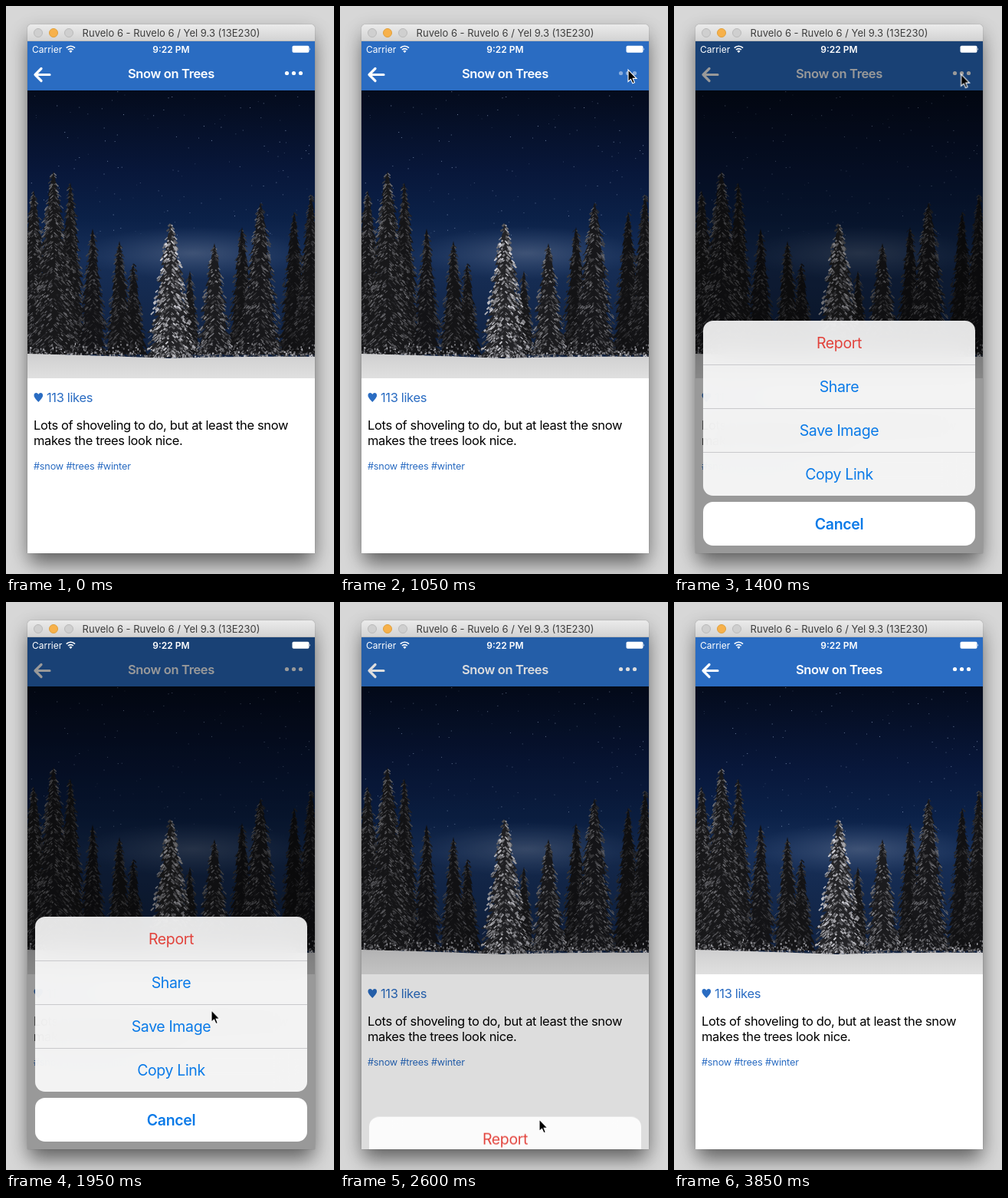
An HTML page with a canvas for the animation above (3900 ms loop, 428 px wide and 740 px high).

```html
<!DOCTYPE html>
<html lang="en">
<head>
<meta charset="utf-8">
<title>Photo action sheet</title>
<style>
  :root { --loop: 3900ms linear infinite; --blue: #2a6cc2; --out: cubic-bezier(.38, .7, .125, 1); }
  * { box-sizing: border-box; }
  html, body { margin: 0; width: 100%; height: 100%; overflow: hidden; background: #d7d7d7; }
  body { position: relative; font-family: Inter, "Open Sans", sans-serif; letter-spacing: -.0225em; }
  body *, canvas { position: absolute; }
  .mid { left: 0; width: 100%; text-align: center; white-space: nowrap; }

  .window {
    left: 28px; top: 24px; width: 375px; height: 689px; border-radius: 5px 5px 0 0;
    box-shadow: 0 0 1px rgba(0,0,0,.5), 0 16px 26px -3px rgba(0,0,0,.5), 0 4px 24px rgba(0,0,0,.12);
  }
  .bar {
    width: 375px; height: 22px; border-radius: 5px 5px 0 0;
    background: linear-gradient(#ebebeb, #d3d3d3); border-bottom: 1px solid #b9b9b9;
    font-size: 13px; line-height: 22px; letter-spacing: 0; color: #3e3e3e;
  }
  .bar i { top: 5px; width: 12px; height: 12px; border-radius: 50%; background: #cfcfcf; border: 1px solid #bababa; }
  .bar .on { background: #f7b14b; border-color: #e0a03c; }

  .screen { top: 22px; width: 375px; height: 667px; overflow: hidden; background: #fff; }
  .nav { width: 375px; height: 64px; background: var(--blue); }
  .nav b { top: 32px; font: 600 16.5px/20px Inter, sans-serif; color: #fff; }
  canvas { left: 0; top: 64px; width: 375px; height: 375px; }
  .likes { left: 25px; top: 454px; font-size: 16.5px; line-height: 20px; color: var(--blue); white-space: nowrap; }
  .text { left: 8px; top: 490px; font-size: 16.5px; line-height: 20px; color: #000; white-space: nowrap; }
  .tags { left: 8px; top: 546px; font-size: 12.7px; line-height: 16px; letter-spacing: -.015em; color: var(--blue); white-space: nowrap; }
  svg { left: 0; top: 0; overflow: visible; }
  .dots { animation: press var(--loop); }
  .dim { inset: 0; background: #000; opacity: 0; animation: dim var(--loop); }
  .status { width: 375px; height: 20px; font-size: 12px; line-height: 21px; letter-spacing: 0; color: #fff; }
  .status span { left: 6px; }
  .status b { font-weight: 600; }

  .sheet { left: 10px; top: 364px; width: 355px; height: 293px; transform: translateY(303px); animation: sheet var(--loop); }
  .group, .cancel { width: 355px; border-radius: 13px; overflow: hidden; }
  .group { height: 228px; background: rgba(255,255,255,.885); -webkit-backdrop-filter: blur(18px); backdrop-filter: blur(18px); }
  .cancel { top: 236px; height: 57px; background: #fff; }
  .row { height: 57px; font-size: 19.5px; line-height: 58px; color: #0a7ae8; }
  .cancel .row { font-weight: 600; }
  .red { color: #e2433c; }
  .line { width: 355px; height: 1px; background: #c9c9cc; animation: lines var(--loop); }
  .cursor { width: 14px; height: 20px; animation: move var(--loop), show var(--loop); }

  @keyframes press { 0%, 25.1% { opacity: 1 } 25.11%, 27.04% { opacity: .45 } 27.05%, 100% { opacity: 1 } }
  @keyframes dim {
    0%, 27.05% { opacity: 0; animation-timing-function: var(--out) }
    34.74% { opacity: .4 }
    63.69% { opacity: .4; animation-timing-function: var(--out) }
    71.38%, 100% { opacity: 0 }
  }
  @keyframes sheet {
    0%, 27.05% { transform: translateY(303px); animation-timing-function: cubic-bezier(.38, .7, .125, 1) }
    34.74% { transform: none }
    63.69% { transform: none; animation-timing-function: cubic-bezier(.38, .7, .125, 1) }
    71.38%, 100% { transform: translateY(303px) }
  }
  @keyframes lines { 0%, 63.69% { opacity: 1 } 63.7%, 100% { opacity: 0 } }
  @keyframes show { 0%, 20.5% { opacity: 0 } 20.51%, 82% { opacity: 1 } 82.01%, 100% { opacity: 0 } }
  @keyframes move {
    0%, 20.5% { transform: translate(350px, 118px); animation-timing-function: ease-out }
    24.3% { transform: translate(376px, 83px) }
    34.6% { transform: translate(376px, 83px); animation-timing-function: ease-in }
    50% { transform: translate(268px, 531px); animation-timing-function: ease-out }
    59%, 100% { transform: translate(260px, 674px) }
  }
</style>
</head>
<body>
<div class="window">
  <div class="bar">
    <i style="left:8px"></i><i class="on" style="left:28px"></i><i style="left:48px"></i>
    <span class="mid">Ruvelo 6 - Ruvelo 6 / Yel 9.3 (13E230)</span>
  </div>
  <div class="screen">
    <div class="nav">
      <b class="mid">Snow on Trees</b>
      <svg width="375" height="64">
        <path d="M29 43.5H10M18 35.5L10 43.5L18 51.5" fill="none" stroke="#fff" stroke-width="3.2" stroke-linecap="round" stroke-linejoin="round"/>
        <g class="dots" fill="#fff"><circle cx="338.5" cy="41.5" r="2.6"/><circle cx="347.5" cy="41.5" r="2.6"/><circle cx="356.5" cy="41.5" r="2.6"/></g>
      </svg>
    </div>
    <canvas id="photo" width="375" height="375"></canvas>
    <svg width="30" height="480"><path d="M14.3 470C11 466.500 8.500 464 8.500 461.200C8.500 457.300 13 456.800 14.300 460C15.600 456.800 20.100 457.300 20.100 461.200C20.100 464 17.600 466.500 14.300 470Z" fill="#2a6cc2"/></svg>
    <div class="likes">113 likes</div>
    <div class="text">Lots of shoveling to do, but at least the snow<br style="position:static">makes the trees look nice.</div>
    <div class="tags">#snow #trees #winter</div>
    <div class="dim"></div>
    <div class="status">
      <span>Carrier</span><b class="mid">9:22 PM</b>
      <svg width="375" height="20">
        <g fill="none" stroke="#fff" stroke-width="1.7"><path d="M50.800 8.600A7.800 7.800 0 0 1 62 8.600M53 11A4.800 4.800 0 0 1 59.800 11"/></g>
        <path d="M56.400 15L54.300 12.700A3 3 0 0 1 58.500 12.700Z" fill="#fff"/>
        <rect x="345.500" y="5.800" width="22" height="9" rx="1.800" fill="#fff"/>
        <path d="M368.300 8.500Q370 10.300 368.300 12.100Z" fill="#fff"/>
      </svg>
    </div>
    <div class="sheet">
      <div class="group">
        <div class="row mid red">Report</div>
        <div class="row mid" style="top:57px">Share</div>
        <div class="row mid" style="top:114px">Save Image</div>
        <div class="row mid" style="top:171px">Copy Link</div>
        <div class="line" style="top:57px"></div>
        <div class="line" style="top:114px"></div>
        <div class="line" style="top:171px"></div>
      </div>
      <div class="cancel"><div class="row mid">Cancel</div></div>
    </div>
  </div>
</div>
<svg class="cursor" viewBox="0 0 14 20">
  <path d="M0 0V15.500L3.500 12.300L5.900 17.800L8.400 16.700L6.100 11.400H11Z" fill="#000" stroke="#fff" stroke-width="1.100"/>
</svg>
<script>
  const g = document.getElementById('photo').getContext('2d');
  let seed = 41;
  const rnd = () => (seed = (seed * 16807) % 2147483647) / 2147483647;
  const grey = v => `rgb(${v | 0},${v | 0},${(v * 1.02 + 2) | 0})`;

  function sky() {
    const fill = g.createLinearGradient(0, 0, 0, 350);
    [[0, '#040b1c'], [.3, '#08173a'], [.48, '#0b2148'], [.62, '#172f58'], [1, '#10213f']]
      .forEach(([at, c]) => fill.addColorStop(at, c));
    g.fillStyle = fill;
    g.fillRect(0, 0, 375, 375);
    // pale haze above the horizon
    g.save();
    g.translate(215, 212);
    g.scale(1, .24);
    const haze = g.createRadialGradient(0, 0, 5, 0, 0, 145);
    haze.addColorStop(0, 'rgba(82,100,132,.65)');
    haze.addColorStop(1, 'rgba(60,84,124,0)');
    g.fillStyle = haze;
    g.fillRect(-150, -150, 300, 300);
    g.restore();
    for (let i = 0; i < 130; i++) {
      g.fillStyle = `rgba(175,195,230,${.15 + rnd() * .5})`;
      g.fillRect(rnd() * 375, rnd() * 190, 1, 1);
    }
  }

  // x, top, half width, brightness of the snow, base
  function tree(x, top, half, light, base = 345) {
    const h = base - top, tiers = Math.round(h / 11);
    const side = dir => {
      const pts = [];
      for (let i = 1; i <= tiers; i++) {
        const w = half * Math.pow(i / tiers, .8) * (.8 + rnd() * .3), y = top + h * i / tiers;
        pts.push([x + dir * w, y], [x + dir * w * .68, y - 1]);
      }
      return pts;
    };
    g.beginPath();
    g.moveTo(x, top);
    side(1).forEach(p => g.lineTo(...p));
    side(-1).reverse().forEach(p => g.lineTo(...p));
    g.closePath();
    g.fillStyle = grey(10 + light * .13);
    g.fill();
    // snow on the drooping branches
    for (let i = 0; i < h * half * .085; i++) {
      const q = Math.pow(rnd(), .65), u = rnd() * 2 - 1;
      const px = x + u * half * Math.pow(q, .8) * .92, py = top + q * h;
      const len = 2 + rnd() * 4, dir = u < 0 ? -1 : 1;
      g.strokeStyle = grey(light * (.3 + rnd() * .75));
      g.lineWidth = .7 + rnd() * (light > 150 ? 2 : 1);
      g.beginPath();
      g.moveTo(px, py);
      g.lineTo(px + dir * len * .7, py + len * .7);
      g.stroke();
    }
  }

  function ground() {
    for (let i = 0; i < 700; i++) {
      const x = rnd() * 375, y = 350 - rnd() * rnd() * 24;
      g.fillStyle = grey(60 + rnd() * 130);
      g.fillRect(x, y, 1 + rnd() * 1.5, 1 + rnd() * 2);
    }
    const snow = g.createLinearGradient(0, 343, 0, 375);
    snow.addColorStop(0, '#cfcfd0');
    snow.addColorStop(1, '#e0e0e0');
    g.fillStyle = snow;
    g.beginPath();
    g.moveTo(0, 343);
    g.quadraticCurveTo(110, 346, 185, 349);
    g.quadraticCurveTo(280, 346, 375, 347);
    g.lineTo(375, 375);
    g.lineTo(0, 375);
    g.fill();
  }

  sky();
  [
    [138, 225, 18, 70], [56, 120, 25, 85], [8, 130, 30, 100], [34, 105, 37, 110],
    [85, 180, 22, 75], [120, 196, 21, 80], [212, 235, 15, 100], [280, 178, 22, 70],
    [348, 158, 23, 55], [370, 135, 25, 70], [304, 146, 32, 105], [244, 199, 25, 135],
    [187, 173, 34, 205, 349]
  ].forEach(t => tree(...t));
  ground();
</script>
</body>
</html>
```
